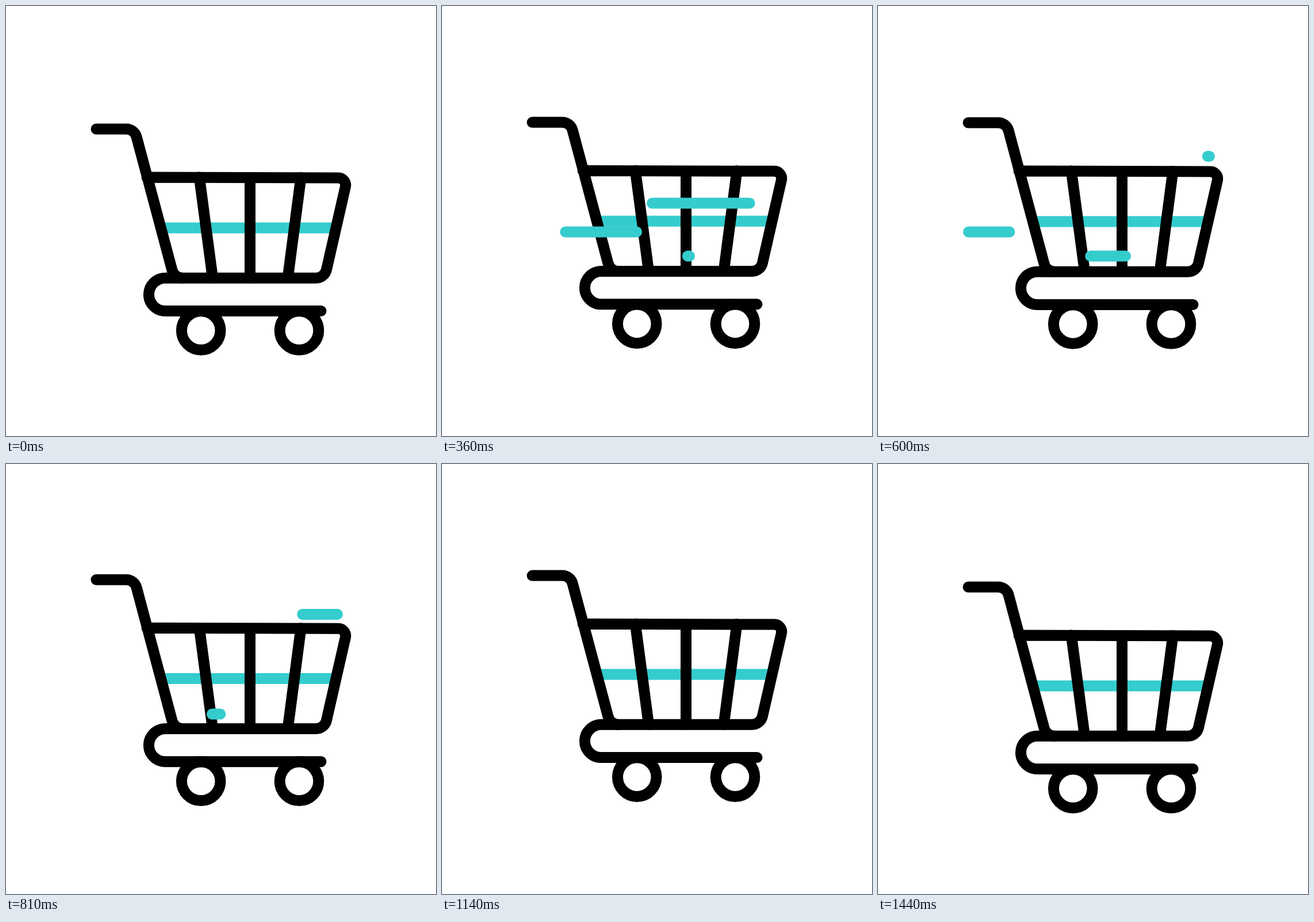
Animation of 748 by 748 pixels, one loop 1470 ms. Source, as an HTML page:

```html
<!DOCTYPE html>
<html lang="en">
<head>
<meta charset="utf-8">
<title>Shopping cart</title>
<style>
  html, body { margin: 0; width: 100%; height: 100%; overflow: hidden; background: #fff; }
  svg { display: block; width: 100%; height: 100%; }
  path, circle { fill: none; stroke: #000; stroke-width: 19; stroke-linecap: round; stroke-linejoin: round; }
  .teal { stroke: #35cccd; }
  .flat { stroke-linecap: butt; }
</style>
</head>
<body>
<svg viewBox="0 0 748 748">
  <g id="cart">
    <path class="teal flat" d="M270 386H573"/>
    <path d="M157 214H209A18.7 18.7 0 0 1 227.1 227.8L288.9 459.2A18.7 18.7 0 0 0 307 473.2H539.3A18.7 18.7 0 0 0 557.5 458.6L590.4 314.6A12.7 12.7 0 0 0 578 299L245 298"/>
    <path d="M336.3 298L359.5 473M424.5 299V473M513 298.5L490.2 473"/>
    <path d="M307 473.2H277A28.65 28.65 0 0 0 277 530.5H548"/>
    <circle cx="339.2" cy="564.5" r="33.8"/>
    <circle cx="510" cy="564.5" r="33.8"/>
  </g>
  <g id="streaks"></g>
</svg>
<script>
const LOOP = 1470;
const cart = document.getElementById('cart');
const layer = document.getElementById('streaks');

// [step, vertical offset] of the bouncing cart
const bounce = [[0, 0], [3.9, -20], [11.45, -5.2], [15.05, -20], [21, -5.2], [24.7, -20], [32, 0]];

// each streak is drawn from right to left, then wiped the same way
const streaks = [
  { y: 343, right: 577, left: 365.5, start: 0 },
  { y: 393, right: 338.5, left: 157.5, start: 3 },
  { y: 435, right: 430.5, left: 358.5, start: 7 },
  { y: 261.5, right: 576.5, left: 504.5, start: 12 }
];

for (const s of streaks) {
  s.el = document.createElementNS('http://www.w3.org/2000/svg', 'path');
  s.el.setAttribute('class', 'teal');
  layer.append(s.el);
}

function ease(n, from, to) {
  const p = Math.min(1, Math.max(0, (n - from) / (to - from)));
  return p * p * (3 - 2 * p);
}

// steps alternate between 60 and 30 ms
function stepAt(ms) {
  const tick = Math.floor(ms / 30);
  return Math.floor(tick / 3) * 2 + (tick % 3 === 2 ? 1 : 0);
}

function offsetAt(n) {
  let y = bounce[0][1];
  for (let i = 1; i < bounce.length; i++) {
    const [a, from] = bounce[i - 1], [b, to] = bounce[i];
    y += (to - from) * ease(n, a, b);
  }
  return y;
}

function draw(ms) {
  const n = stepAt(ms % LOOP);
  cart.setAttribute('transform', `translate(0 ${offsetAt(n).toFixed(2)})`);
  for (const s of streaks) {
    const at = p => s.right + (s.left - s.right) * p;
    const head = at(ease(n, s.start, s.start + 8));
    const tail = at(ease(n, s.start + 6, s.start + 13));
    s.el.setAttribute('d', tail - head > 0.01 ? `M${tail} ${s.y}H${head}` : '');
  }
}

let begin;
function loop(now) {
  begin ??= now;
  draw(Math.max(0, now - begin));
  requestAnimationFrame(loop);
}
draw(0);
requestAnimationFrame(loop);
</script>
</body>
</html>
```
